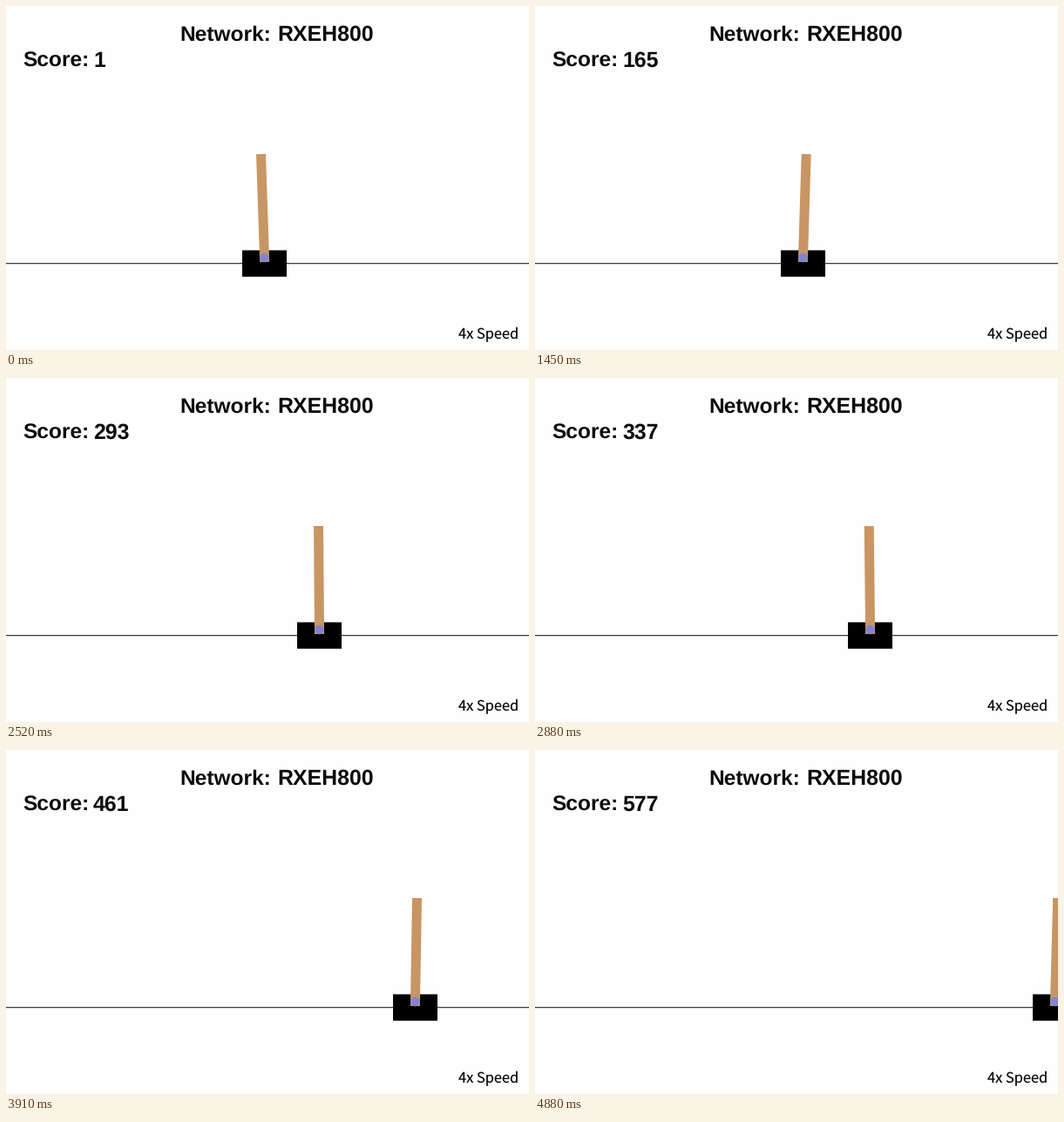
Write a matplotlib script that moves like this. It is 600 by 395 pixels and loops after 4910 ms.

```python
import matplotlib.pyplot as plt
import numpy as np
from matplotlib.animation import FuncAnimation
from matplotlib.patches import Circle, Polygon, Rectangle

W, H, DPI = 600, 395, 100
LOOP_MS, FRAMES = 4910, 148
HOLD = 2                      # frames before the run starts
CART_W, CART_H, CART_Y = 51, 30.3, 280.5
PIVOT_Y, POLE_UP, POLE_DOWN, POLE_HALF = 289, 119, 5, 5.5

# Key poses: step, left edge of the cart, sideways lean of the pole tip
STEPS = np.array([0, 23, 59, 73, 95, 115, 144], float)
LEFT = np.array([271, 275, 302, 334, 386, 444, 571], float)
LEAN = np.array([-4, 0, 4, -1, 0, 2, 3.2])
LAST = int(STEPS[-1])


def smooth(step, values):
    """Cubic Hermite curve through the key poses."""
    slopes = np.gradient(values, STEPS)
    i = min(np.searchsorted(STEPS, step, side="right") - 1, len(STEPS) - 2)
    span = STEPS[i + 1] - STEPS[i]
    u = (step - STEPS[i]) / span
    return ((2 * u**3 - 3 * u**2 + 1) * values[i]
            + (u**3 - 2 * u**2 + u) * span * slopes[i]
            + (3 * u**2 - 2 * u**3) * values[i + 1]
            + (u**3 - u**2) * span * slopes[i + 1])


def pole_corners(x, lean):
    angle = np.arcsin(lean / POLE_UP)
    along = np.array([np.sin(angle), -np.cos(angle)])
    across = np.array([np.cos(angle), np.sin(angle)])
    pivot = np.array([x, PIVOT_Y])
    return [pivot + a * along + b * across
            for a, b in ((-POLE_DOWN, -POLE_HALF), (POLE_UP, -POLE_HALF),
                         (POLE_UP, POLE_HALF), (-POLE_DOWN, POLE_HALF))]


plt.rcParams["text.hinting"] = "none"
fig = plt.figure(figsize=(W / DPI, H / DPI), dpi=DPI, facecolor="#fefefe")
ax = fig.add_axes([0, 0, 1, 1])
ax.set(xlim=(0, W), ylim=(H, 0))
ax.axis("off")


def label(x, y, text, px=24.5, family="Liberation Sans", weight="bold"):
    return ax.text(x, y, text, fontsize=px * 72 / DPI, family=family,
                   weight=weight, color="#0c0c0e", va="baseline")


def shape(patch, color, z):
    patch.set(facecolor=color, linewidth=0, zorder=z, snap=False)
    return ax.add_patch(patch)


label(199, 40, "Network:")
label(311.5, 40, "RXEH800", 24.9)
label(19, 70, "Score:")
score = label(100, 70, "1", 24.9)
label(519.2, 382, "4x Speed", 16.4, "Noto Sans CJK JP", "normal")

shape(Rectangle((0, 295.2), W, 1), "#0a0a0a", 1)
cart = shape(Rectangle((0, CART_Y), CART_W, CART_H), "black", 2)
pole = shape(Polygon(pole_corners(0, 0)), "#c89664", 3)
axle = shape(Circle((0, PIVOT_Y), 5.3), "#8484cb", 4)


def draw(frame):
    step = min(max(0, frame - HOLD), LAST)
    left = round(smooth(step, LEFT))
    x = left + CART_W / 2
    cart.set_x(left)
    pole.set_xy(pole_corners(x, smooth(step, LEAN)))
    axle.center = (x, PIVOT_Y)
    score.set_text(str(1 + 4 * step))
    return cart, pole, axle, score


anim = FuncAnimation(fig, draw, frames=FRAMES, interval=LOOP_MS / FRAMES,
                     repeat=True, repeat_delay=0)
plt.show()
```
